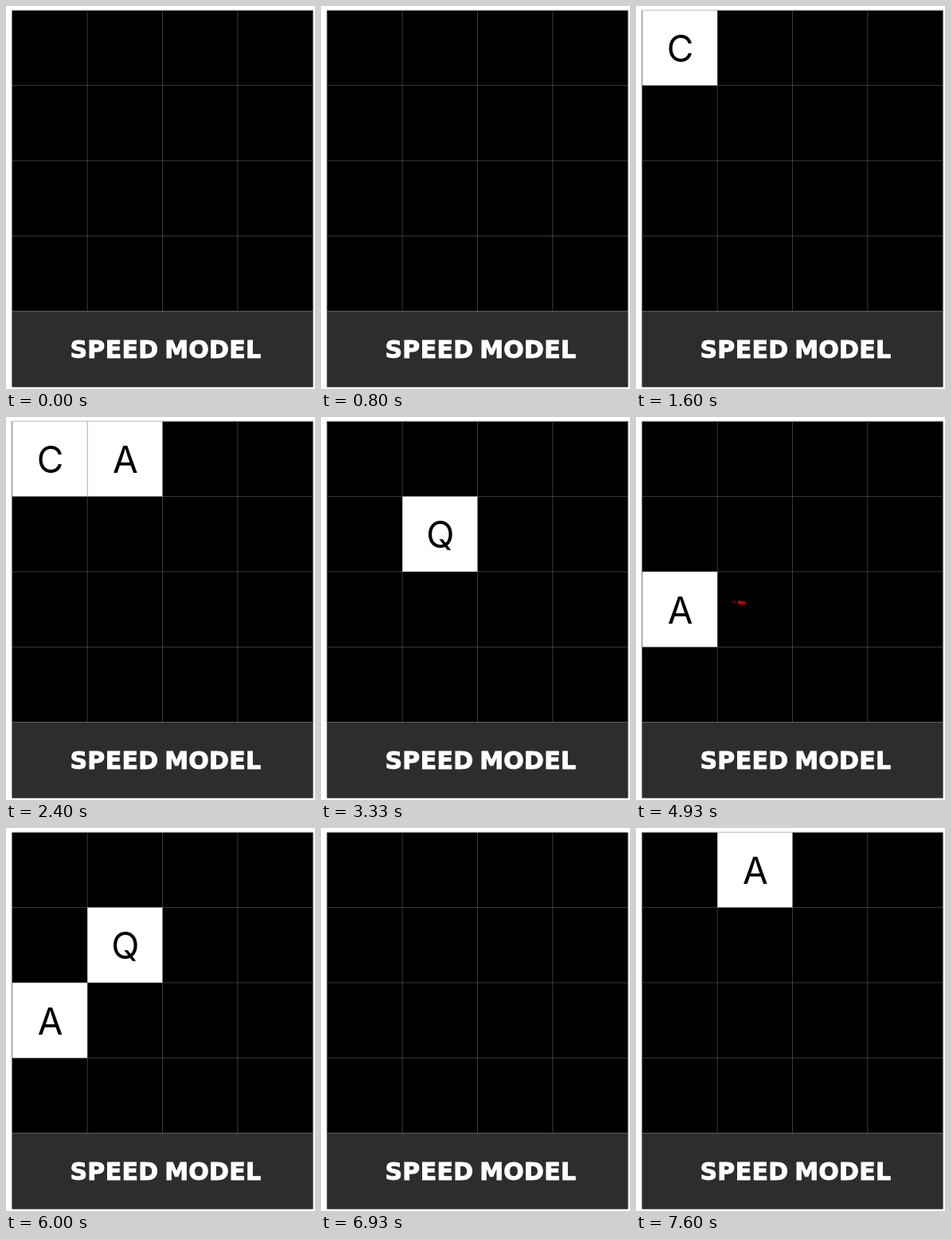
Animation of 388 by 480 pixels, one loop 8000 ms. Source, as an HTML page:

```html
<!DOCTYPE html>
<html lang="en">
<head>
<meta charset="utf-8">
<title>Speed model</title>
<style>
  html, body { margin: 0; width: 100%; height: 100%; overflow: hidden; background: #fff; }
  svg { display: block; width: 388px; height: 480px; }
  .card rect { fill: #fff; }
  .card text { font: 46px Inter, "Liberation Sans", sans-serif; text-anchor: middle; }
  .grid { fill: none; stroke: rgba(128, 128, 128, .45); }
  .title {
    font: bold 30px "DejaVu Sans", sans-serif;
    letter-spacing: .3px; word-spacing: -3px; text-anchor: middle;
    fill: #fff; stroke: #fff; stroke-width: 1px;
  }
  .streak { fill: none; stroke: #b8000c; stroke-linejoin: round; }
</style>
</head>
<body>
<svg viewBox="0 0 388 480">
  <rect x="7.4" y="5.6" width="378.2" height="377" fill="#000"/>
  <rect x="7.4" y="382.4" width="378.2" height="95.3" fill="#2d2d2d"/>
  <g id="cards"></g>
  <path id="grid" class="grid"/>
  <text class="title" x="200.5" y="440.7">SPEED MODEL</text>
  <polyline id="tail" class="streak" pathLength="1" stroke-width="3" opacity=".45"/>
  <polyline id="head" class="streak" pathLength="1" stroke-width="4.5"/>
</svg>
<script>
const LOOP = 8000, X0 = 7.8, Y0 = 5.2, CELL = 94.35;
const NS = "http://www.w3.org/2000/svg";
const byId = id => document.getElementById(id);

// letter, column, row, spans of time in which the card lies open
const cards = [
  ["C", 0, 0, [[1270, 2800]]],
  ["A", 1, 0, [[2070, 2800], [7200, 8000]]],
  ["Q", 1, 1, [[2800, 4600], [6000, 6530]]],
  ["H", 0, 1, [[3600, 4600]]],
  ["A", 0, 2, [[4600, 6530]]]
];

// start, end, path of each jump of the gaze
const jumps = [
  [200, 330, "70,338 122,322"],
  [470, 800, "122,318 239,200 60,64"],
  [1270, 1600, "60,64 158,62"],
  [2070, 2400, "158,62 149,144"],
  [2800, 3130, "149,144 27,136"],
  [3270, 3330, "25,134 20,128"],
  [4070, 4270, "21,145 45,224"],
  [4600, 5070, "45,226 137,233"],
  [5330, 5530, "137,232 145,152"],
  [6530, 6930, "145,152 149,69"],
  [7200, 7600, "149,69 62,258"]
];

function add(parent, tag, attrs) {
  const el = document.createElementNS(NS, tag);
  for (const k in attrs) el.setAttribute(k, attrs[k]);
  return parent.appendChild(el);
}

const groups = cards.map(([letter, col, row]) => {
  const g = add(byId("cards"), "g", { class: "card" });
  const x = X0 + col * CELL, y = Y0 + row * CELL;
  add(g, "rect", { x, y, width: CELL, height: CELL });
  add(g, "text", { x: x + 47.7, y: y + 64.6 }).textContent = letter;
  return g;
});

let lines = "";
for (let i = 0; i < 5; i++) {
  const d = i * CELL, size = 4 * CELL;
  lines += `M${X0 + d} ${Y0}v${size}M${X0} ${Y0 + d}h${size}`;
}
byId("grid").setAttribute("d", lines);

function span(el, points, from, to) {
  el.setAttribute("points", points);
  el.setAttribute("stroke-dasharray", `${Math.max(0, to - from)} 3`);
  el.setAttribute("stroke-dashoffset", -from);
}

function draw(t) {
  cards.forEach(([, , , spans], i) => {
    const open = spans.some(([a, b]) => t >= a && t < b);
    groups[i].style.display = open ? "" : "none";
  });
  const jump = jumps.find(([a, b]) => t >= a && t < b);
  for (const id of ["head", "tail"]) byId(id).style.display = jump ? "" : "none";
  if (!jump) return;
  const [a, b, points] = jump;
  const u = (t - a) / (b - a);
  const front = 1 - (1 - Math.min(1, .1 + u * 1.6)) ** 2;
  const back = Math.min(front, 1 - (1 - u) ** 1.4);
  const len = front - back;
  span(byId("tail"), points, back, back + len * .3);
  span(byId("head"), points, back + len * .45, front);
}

const start = performance.now();
function tick() {
  draw((performance.now() - start) % LOOP);
  requestAnimationFrame(tick);
}
tick();
</script>
</body>
</html>
```
